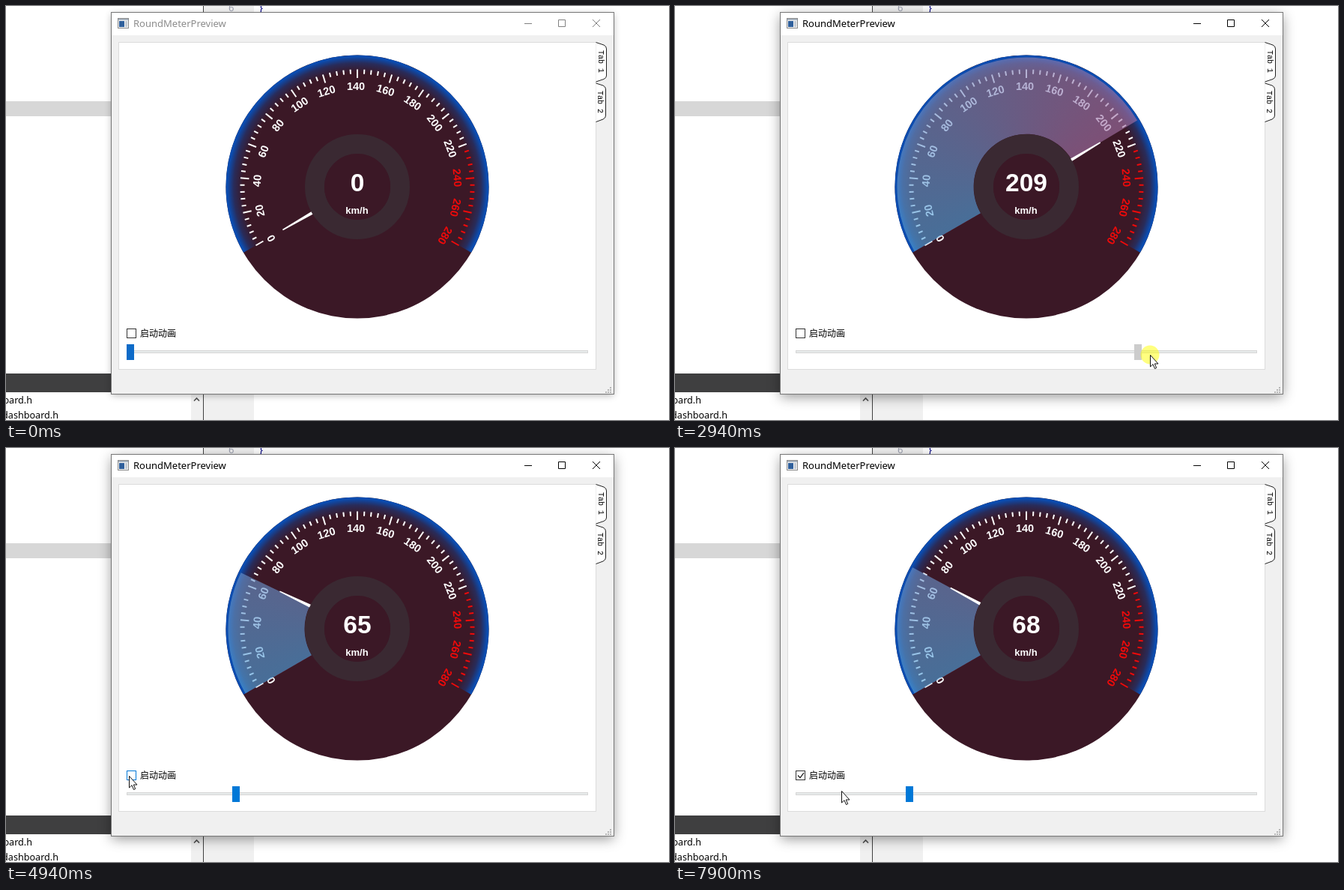
Animation, 885 px wide and 552 px high, one loop 8000 ms. Source, as an HTML page:

```html
<!DOCTYPE html>
<html lang="en">
<head>
<meta charset="utf-8">
<title>Gauge</title>
<style>
  html, body { margin: 0; width: 100%; height: 100%; overflow: hidden; background: #fff; }
  #stage { position: relative; width: 885px; height: 552px; overflow: hidden; }
  svg { position: absolute; left: 0; top: 0; }
  #shadow { position: absolute; left: 141px; top: 9px; width: 670px; height: 508px; }
  #fill {
    position: absolute; left: 294px; top: 66px; width: 350px; height: 350px;
    background: conic-gradient(from -120deg, rgba(80,163,222,.62) 0deg, rgba(193,98,149,.62) 240deg);
  }
  .ui { font: 13px "Noto Sans", "Open Sans", sans-serif; }
  .files { font-size: 12.6px; text-anchor: end; }
  .cjk { font: 12px "Noto Sans CJK SC", "Noto Sans CJK", sans-serif; }
  .tab { font: 10px "Liberation Mono", monospace; }
  .dial { font-family: "Liberation Sans", Arial, sans-serif; font-weight: bold; text-anchor: middle; fill: #fff; }
</style>
</head>
<body>
<div id="stage">
  <svg width="885" height="552">
    <rect y="127" width="141" height="20" fill="#d7d7d7"/>
    <rect y="490" width="141" height="25" fill="#3f3f40"/>
    <rect x="247" y="515" width="16" height="37" fill="#f0f0f0"/>
    <path d="M251 526.5l3.5-3.5 3.5 3.5" fill="none" stroke="#505050" stroke-width="1.6"/>
    <rect x="264" width="67" height="552" fill="#f0f0f0"/>
    <path d="M263.5 0V552" stroke="#404040"/>
    <text class="ui" x="297" y="7" fill="#9a9eae">6</text>
    <text class="ui" x="338" y="7" fill="#000080">}</text>
    <text class="ui files" x="35" y="530">dashboard.h</text>
    <text class="ui files" x="70" y="550">dashboard.h</text>
  </svg>
  <div id="shadow"></div>
  <svg width="885" height="552">
    <defs>
      <radialGradient id="rim" gradientUnits="userSpaceOnUse" cx="469" cy="241" r="175.5">
        <stop offset=".87" stop-color="#0a4db2" stop-opacity="0"/>
        <stop offset=".94" stop-color="#0a4db2" stop-opacity=".37"/>
        <stop offset=".99" stop-color="#0a4db2"/>
      </radialGradient>
    </defs>
    <rect x="140.5" y="8.5" width="671" height="509" fill="#f0f0f0" stroke="#777"/>
    <rect x="141" y="9" width="670" height="30" fill="#fff"/>
    <rect x="149.5" y="16.5" width="14" height="13" fill="#f4f4f4" stroke="#8b8b8b"/>
    <rect x="150" y="17" width="13" height="2" fill="#a9b4c0"/>
    <rect x="151" y="20" width="7" height="8" fill="#30609c"/>
    <rect x="159" y="20" width="3" height="8" fill="#c5ccd4"/>
    <text id="title" class="ui" x="170" y="28">RoundMeterPreview</text>
    <path id="buttons" d="M692 23.5h10M737.5 18.5h9v9h-9zM783 18l10 10m0-10l-10 10" fill="none"/>
    <path d="M807 508v8M804 511v5M801 514v2" stroke="#b5b5b5" stroke-width="2" stroke-dasharray="2 1"/>
    <rect x="150.5" y="48.5" width="637" height="436" fill="#fff" stroke="#dcdcdc"/>
    <g fill="#fff" stroke="#222">
      <path d="M787.5 48.5L798 52Q801.5 53.5 801.5 57V93Q801.5 96 798 97.5L787.5 101"/>
      <path d="M787.5 103L797 106Q800.5 107.5 800.5 111V146Q800.5 149.5 797 151L787.5 154.5"/>
    </g>
    <text class="tab" transform="translate(790.5 59) rotate(90)">Tab 1</text>
    <text class="tab" transform="translate(789.5 113) rotate(90)">Tab 2</text>

    <circle cx="469" cy="241" r="175.5" fill="#3b1826"/>
    <path d="M469 241L317 328.75A175.5 175.5 0 1 1 621 328.75Z" fill="url(#rim)"/>
    <g id="scale" class="dial" font-size="14.5" transform="translate(469 241)"></g>

    <rect id="box" x="161.5" y="430.5" width="12" height="12" fill="#fff"/>
    <path id="tick" d="M164 436.5l3 3.2 5-6.5" fill="none" stroke="#222" stroke-width="1.3"/>
    <text class="cjk" x="179" y="441">启动动画</text>
    <rect x="161.5" y="459.5" width="615" height="3" fill="#e7eaea" stroke="#d6d6d6"/>
    <rect id="handle" y="451" width="10" height="21"/>
  </svg>
  <div id="fill"></div>
  <svg width="885" height="552">
    <circle cx="469" cy="241" r="57" fill="none" stroke="#3a2932" stroke-width="26"/>
    <circle cx="469" cy="241" r="44" fill="#3b1826"/>
    <path id="needle" d="M-2 -70L-.8 -115H.8L2 -70Z" fill="#fff"/>
    <text id="speed" class="dial" x="469" y="247" font-size="33.5"></text>
    <text class="dial" x="468.5" y="277" font-size="13">km/h</text>
    <g id="cursor">
      <circle id="halo" r="12.5" fill="#ff0" fill-opacity=".5"/>
      <path d="M.5 .5V16L4 12.7 6.5 18.5 8.7 17.5 6.3 12H11Z" fill="#fff" stroke="#111"/>
    </g>
  </svg>
</div>
<script>
const $ = id => document.getElementById(id);
const LOOP = 8000, MAX = 280, SWEEP = 240;
const GRAB = 1840, DROP = 4460, LAG = 20;

// eased progress from a to b; a higher power brakes harder
const ease = (t, a, b, power = 1) =>
  1 - (1 - Math.min(1, Math.max(0, (t - a) / (b - a)))) ** power;

// legs are [from, to, power, ...goal]
const follow = (t, start, legs) => legs.reduce((pos, [from, to, power, ...goal]) => {
  const k = ease(t, from, to, power);
  return pos.map((p, i) => p + (goal[i] - p) * k);
}, start);

const valueAt = t => follow(t, [0], [
  [GRAB, 2660, 1, 38], [2660, 3430, 3, 269], [3560, 4320, 5 / 3, 65],
  [6380, 6520, 1, 75], [6520, 7150, 1, 68]
])[0];

const handleX = v => 161 + v / MAX * 606;

function pointerAt(t) {
  if (t < GRAB) return follow(t, [612, 516], [
    [200, 480, 2, 359, 484], [860, 1560, 1, 156, 452], [1560, GRAB, 1, 166, 463]
  ]);
  if (t < DROP) return [handleX(valueAt(t + LAG)) + 5, 465 + 35 * ease(t, 3150, 3430)];
  return follow(t, [307, 500], [
    [DROP, 4940, 1, 164, 437], [5430, 5980, 1, 315, 456], [6110, 6180, 1, 312, 466],
    [6380, 7150, 1.5, 184, 467], [7220, 7360, 1, 144, 463], [7360, 7700, 1, 230, 463],
    [7850, 7900, 1, 222, 457]
  ]);
}

const pressed = t => t >= GRAB && t < DROP || t >= 5220 && t < 5400 || t >= 6110 && t < 7850;

function buildScale() {
  let out = "";
  for (let v = 0; v <= MAX; v += 4) {
    const major = v % 20 === 0, color = v > 220 ? "#f00a0a" : "#fff";
    out += `<g transform="rotate(${v / MAX * SWEEP - 120})">` +
      `<path d="M0 -156.5V${major ? -145 : -150.5}" stroke="${color}" stroke-width="2"/>` +
      (major ? `<text x="-2" y="-129" fill="${color}">${v}</text>` : "") + "</g>";
  }
  $("scale").innerHTML = out;
}

// ring segment from the scale start, in the fill's own coordinates
function segment(deg) {
  const at = (r, d) => {
    const a = (d - 210) * Math.PI / 180;
    return `${(175 + r * Math.cos(a)).toFixed(2)} ${(175 + r * Math.sin(a)).toFixed(2)}`;
  };
  const large = deg > 180 ? 1 : 0;
  return `M${at(172.5, 0)}A172.5 172.5 0 ${large} 1 ${at(172.5, deg)}` +
    `L${at(70.5, deg)}A70.5 70.5 0 ${large} 0 ${at(70.5, 0)}Z`;
}

function draw(t) {
  const v = Math.round(valueAt(t)), deg = v / MAX * SWEEP;
  const [x, y] = pointerAt(t).map(Math.round);
  const active = t >= GRAB, shown = t >= 200;
  const hover = shown && x >= 161 && x < 227 && y >= 430 && y < 444;

  $("title").setAttribute("fill", active ? "#000" : "#8c8c8c");
  $("buttons").setAttribute("stroke", active ? "#000" : "#808080");
  $("shadow").style.boxShadow = active
    ? "0 4px 16px rgba(0,0,0,.42)" : "0 2px 9px rgba(0,0,0,.3)";

  $("speed").textContent = v;
  $("needle").setAttribute("transform", `translate(469 241) rotate(${deg - 120})`);
  $("fill").style.display = v ? "" : "none";
  $("fill").style.clipPath = `path("${segment(deg)}")`;

  $("handle").setAttribute("x", Math.round(handleX(v)));
  $("handle").setAttribute("fill", !active ? "#0e6bc8" : t < DROP ? "#ccc" : "#0078d7");
  $("box").setAttribute("stroke", hover ? "#0078d7" : "#333");
  $("tick").style.display = t >= 5360 ? "" : "none";

  $("cursor").style.display = shown ? "" : "none";
  $("cursor").setAttribute("transform", `translate(${x} ${y})`);
  $("halo").style.display = pressed(t) ? "" : "none";
}

buildScale();
draw(0);
let start;
requestAnimationFrame(function loop(now) {
  start ??= now;
  draw((now - start) % LOOP);
  requestAnimationFrame(loop);
});
</script>
</body>
</html>
```
